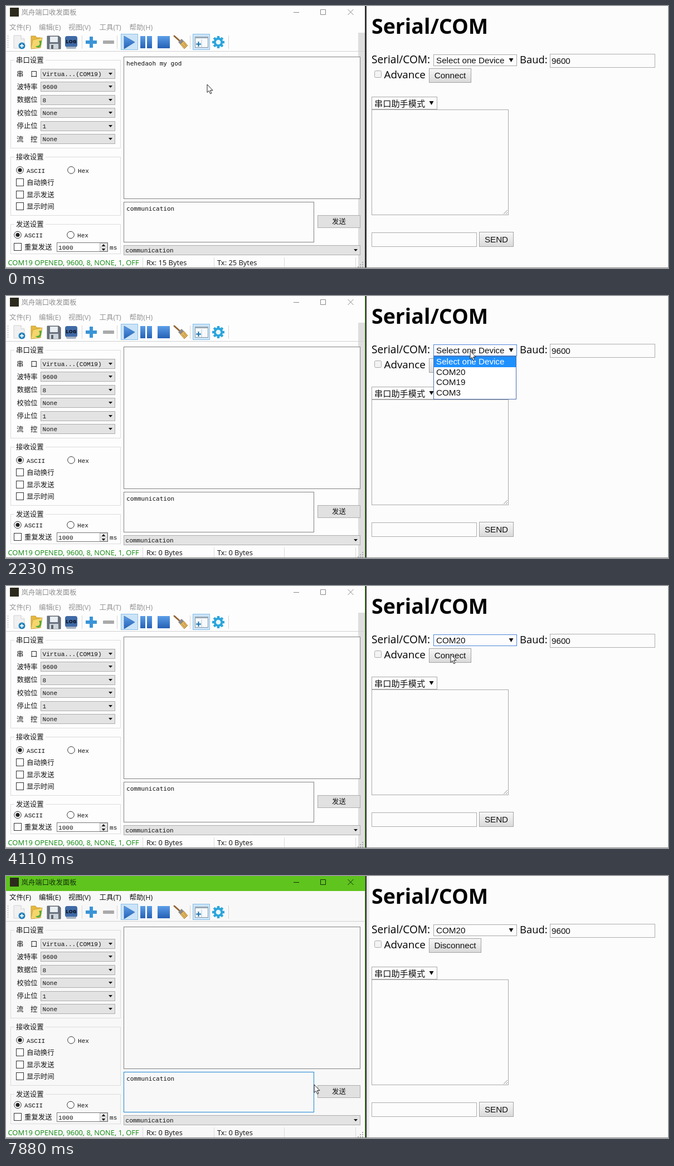
These frames come from a looping animation (1188x471 px, 8000 ms). An HTML page:

```html
<!DOCTYPE html>
<html lang="zh">
<head>
<meta charset="utf-8">
<title>Serial/COM</title>
<style>
html, body { margin: 0; width: 100%; height: 100%; overflow: hidden; background: #fcfcfc; }
svg { display: block; width: 1188px; height: 471px; }
text { white-space: pre; }
.ui { font-family: "Open Sans", "Noto Sans CJK SC", "Noto Sans CJK", sans-serif; }
.web { font-family: "Liberation Sans", "Noto Sans CJK SC", "Noto Sans CJK", sans-serif; }
.mono { font-family: "Liberation Mono", "Noto Sans CJK SC", "Noto Sans CJK", monospace; }
.code { font-family: "DejaVu Sans Mono", monospace; }
</style>
</head>
<body>
<svg id="stage" viewBox="0 0 1188 471" xmlns="http://www.w3.org/2000/svg"></svg>
<script>
const LOOP = 8000;

// Shape helpers; edges fall on whole pixels.
const rect = (x, y, w, h, fill, extra = '') =>
  `<rect x="${x}" y="${y}" width="${w}" height="${h}" fill="${fill}" ${extra}/>`;
const frame = (x, y, w, h, fill, stroke, extra = '') =>
  rect(x + .5, y + .5, w - 1, h - 1, fill, `stroke="${stroke}" ${extra}`);
const path = (d, fill, stroke = 'none', width = 1, extra = '') =>
  `<path d="${d}" fill="${fill}" stroke="${stroke}" stroke-width="${width}" ${extra}/>`;
const circle = (x, y, r, fill, stroke = 'none', width = 1) =>
  `<circle cx="${x}" cy="${y}" r="${r}" fill="${fill}" stroke="${stroke}" stroke-width="${width}"/>`;
const text = (x, y, s, size, font = 'ui', fill = '#111', extra = '') =>
  `<text x="${x}" y="${y}" class="${font}" font-size="${size}" fill="${fill}" ${extra}>${s}</text>`;
const group = (id, body) => `<g id="${id}">${body}</g>`;
const down = (x, y, w, h) => path(`M${x} ${y}h${w}l${-w / 2} ${h}z`, '#111');

const label = (x, y, s) => text(x, y, s, 12.4);
const mono = (x, y, s) => text(x, y, s, 11.05, 'mono');
const code = (x, y, s) => text(x, y, s, 11.02, 'code');
const web = (x, y, s, extra) => text(x, y, s, 15.2, 'web', '#111', extra);

const combo = (x, y, w, h, s) =>
  frame(x, y, w, h, '#e3e3e3', '#adadad') + mono(x + 3.5, y + h / 2 + 4, s) +
  down(x + w - 12, y + h / 2 - 2, 7, 4);
const check = (x, y, s) =>
  frame(x, y, 14, 14, '#fff', '#333') + label(x + 19, y + 11.5, s);
const radio = (x, y, s, on) =>
  circle(x, y, 6.3, '#fff', '#333') + (on ? circle(x, y, 3.6, '#222') : '') + mono(x + 12, y + 4.5, s);
const fieldset = (y, h, s) =>
  frame(8, y, 198, h, 'none', '#dcdcdc') + rect(15, y, 56, 1, 'var(--bg)') + label(18, y + 5, s);
const button = (x, y, w, h, s) =>
  frame(x, y, w, h, 'url(#btn)', '#a3a3a3') + web(x + w / 2, y + h / 2 + 5, s, 'text-anchor="middle"');

function toolbar() {
  const sep = [136, 199, 330, 399].map(x => rect(x, 53, 1, 24, '#d5d5d5')).join('');
  const dots = [53, 57, 61, 65, 69, 73].map(y => rect(3, y, 1, 2, '#aaa')).join('');
  const teeth = [...Array(8)].map((_, i) =>
    rect(378.8, 54, 4.4, 5, '#2ba5dc', `transform="rotate(${i * 45} 381 65)"`)).join('');
  return sep + dots +
    path('M14 53h13l6 6v17h-19z', '#f0f0f0', '#d2d2d2') + path('M27 53v6h6', '#fff', '#ccc') +
    circle(28.5, 71.5, 6, '#1f80b8') + path('M28.5 68v7M25 71.5h7', 'none', '#fff', 1.8) +
    path('M45 54h8l2 3h7v18h-17z', '#e7b83c', '#c39a35') + path('M48 61l17-4-3 18-17 2z', '#f5d66c', '#d1a63c') +
    path('M53 72c8 1 9-5 6-9l5-1-1 6c0 7-6 9-10 4z', '#4cab39') +
    path('M74 54h21l3 3v20h-24z', '#69737f', '#58616b') + rect(79, 55, 14, 10, '#e9eef2') +
    rect(78, 68, 16, 9, '#cdd4da') + rect(81, 70, 4, 7, '#5d6670') +
    rect(106, 54, 22, 20, '#3f6aa6', 'rx="4"') + rect(108, 73, 18, 4, '#a8b4c3', 'rx="2"') +
    text(117, 67, 'LOG', 9.2, 'ui', '#101828', 'font-weight="800" text-anchor="middle"') +
    path('M150 55h6v7h7v6h-7v7h-6v-7h-7v-6h7z', '#3a94d6') +
    rect(174, 62, 20, 6, '#aaa', 'rx="1"') +
    frame(206, 50, 31, 29, '#cce4f7', '#88bfe8') +
    path('M212 54l19 11-19 12z', 'url(#blue)', '#2867b4', .7) +
    rect(241, 54, 9, 22, 'url(#blue)') + rect(253, 54, 9, 22, 'url(#blue)') +
    rect(272, 54, 22, 22, 'url(#blue)') +
    rect(299, 51, 29, 28, '#d9ebf9', 'id="hover"') +
    path('M302 54l10 9', 'none', '#936331', 3, 'stroke-linecap="round"') +
    path('M309 65l6-6 4 4-6 6z', '#8a8a8a') + path('M313 69l6-6 7 8-6 6z', '#e2b65c', '#a87c38', .8) +
    path('M316 69l6 6M319 66l5 7', 'none', '#a87c38', .8) +
    frame(335, 50, 31, 29, '#cce4f7', '#88bfe8') +
    frame(339, 55, 24, 20, '#f6fafc', '#8a969e') + rect(339, 55, 24, 3, '#9aa9b3') +
    path('M351 60v14', 'none', '#bcc7ce') + path('M345.5 64v9M341 68.5h9', 'none', '#176fae', 2) +
    teeth + circle(381, 65, 6.3, '#eef8fc', '#2ba5dc', 4) +
    rect(0, 81, 643, 1, '#d0d0d0');
}

function settings() {
  const rows = [['Virtua...(COM19)'], ['9600', '波特率'], ['8', '数据位'], ['None', '校验位'],
    ['1', '停止位'], ['None']];
  const fields = rows.map(([value, name], i) => {
    const y = 113 + i * 23.4;
    const pair = i ? ['流', '控'] : ['串', '口'];
    const head = name ? label(19.5, y + 13.5, name)
      : label(19, y + 13.5, pair[0]) + label(44, y + 13.5, pair[1]);
    return head + combo(62, Math.round(y), 134, 18, value);
  }).join('');
  return fieldset(97, 159, '串口设置') + fields +
    fieldset(271, 106, '接收设置') + radio(25, 295, 'ASCII', true) + radio(117, 295, 'Hex') +
    check(18, 310, '自动换行') + check(18, 332, '显示发送') + check(18, 353, '显示时间') +
    fieldset(392, 54, '发送设置') + radio(21, 411.5, 'ASCII', true) + radio(116, 411.5, 'Hex') +
    check(14, 426, '重复发送') + frame(91, 425, 92, 17, '#fff', '#777') + mono(94, 437.5, '1000') +
    frame(168, 426, 14, 8, '#eee', '#bbb') + frame(168, 433, 14, 8, '#eee', '#bbb') +
    path('M171.5 432h7l-3.5-4z', '#111') + down(171.5, 436, 7, 4) + mono(186, 438, 'ms');
}

function monitor() {
  const menus = [[6, '文件(F)'], [59, '编辑(E)'], [112, '视图(V)'], [167.5, '工具(T)'], [221.5, '帮助(H)']];
  const grip = [[639, 461], [639, 465], [635, 465], [639, 469], [635, 469], [631, 469]]
    .map(([x, y]) => rect(x, y - 1, 2, 2, '#aaa')).join('');
  return rect(0, 0, 644, 471, 'var(--bg)') +
    rect(0, 0, 644, 27, 'var(--bar)') +
    rect(7, 3, 16, 16, '#2b2a1c') +
    text(27.5, 15.7, '岚舟端口收发面板', 12.4, 'ui', 'var(--title)') +
    path('M516 11.5h10M564.5 6.5h9v9h-9zM613.5 6l10 10M623.5 6l-10 10', 'none', 'var(--ctrl)') +
    menus.map(([x, s]) => text(x, 42.5, s, 12.5, 'ui', 'var(--menu)')).join('') +
    rect(632, 48, 12, 422, '#dedede', 'id="strip"') +
    toolbar() + settings() +
    frame(211, 91, 425, 256, 'var(--box)', '#828282') +
    group('received', code(216, 107, 'hehedaoh my god')) +
    frame(211, 352, 342, 73, 'var(--box)', 'var(--edit)') + code(216, 368, 'communication') +
    rect(303, 358, 1, 13, '#000', 'id="caret"') +
    frame(559, 376, 77, 23, '#e1e1e1', '#adadad') + label(585, 392, '发送') +
    combo(211, 430, 425, 18, 'communication') +
    [245, 373, 499, 627].map(x => rect(x, 452, 1, 18, '#dadada')).join('') +
    text(3.5, 466, 'COM19 OPENED, 9600, 8, NONE, 1, OFF', 12.9, 'ui', '#118a11') +
    text(252, 466, '', 12.9, 'ui', '#111', 'id="rx"') +
    text(379, 466, '', 12.9, 'ui', '#111', 'id="tx"') + grip;
}

const options = ['Select one Device', 'COM20', 'COM19', 'COM3'];

function page() {
  const list = options.map((s, i) =>
    rect(768, Math.round(109 + i * 18.7), 147, 19, '#fff', `id="row${i}"`) +
    web(772, 122.7 + i * 18.8, s, `id="opt${i}"`)).join('');
  return rect(644, 0, 544, 471, '#fcfcfc') +
    rect(647, 0, 6, 471, 'url(#shade)', 'id="shadow"') +
    rect(644, 0, 3, 471, '#333') + rect(644, 0, 1, 471, '#4c9a22', 'id="edge"') +
    text(656, 49.5, 'Serial/COM', 37.5, 'ui', '#000', 'font-weight="700"') +
    text(656, 103, 'Serial/COM:', 19.1, 'ui', '#000') +
    frame(767, 87, 150, 21, '#fdfdfd', '#a9a9a9', 'id="device"') +
    web(772, 103, '', 'id="choice"') + down(902.5, 94, 8, 7) +
    text(922, 103, 'Baud:', 18.4, 'ui', '#000') +
    frame(976, 86, 189, 25, '#fcfcfc', '#adadad') + web(979, 103.5, '9600') +
    frame(661, 116, 13, 13, '#f3f3f3', '#aaa', 'rx="2"') +
    text(678.5, 130, 'Advance', 18.8, 'ui', '#000') +
    group('connect', button(759, 112, 76, 26, 'Connect')) +
    group('disconnect', button(759, 112, 94, 26, 'Disconnect')) +
    frame(656, 163, 118, 23, '#fcfcfc', '#a9a9a9') + web(661, 180.5, '串口助手模式') + down(759.5, 171, 8, 7) +
    frame(656, 186, 246, 190, '#fcfcfc', '#a9a9a9') +
    path('M893 374l7-7M897 374l3-3', 'none', '#888') +
    frame(656, 407, 189, 26, '#fcfcfc', '#adadad') +
    button(849, 406, 62, 27, 'SEND') +
    group('popup', frame(767, 108, 149, 78, '#fff', '#4d6fa8') + list) +
    rect(0, 470, 1188, 1, '#8a8a8a');
}

const gradient = (id, a, b, dir) =>
  `<linearGradient id="${id}" x2="${dir ? 1 : 0}" y2="${dir ? 0 : 1}">` +
  `<stop stop-color="${a}"/><stop offset="1" stop-color="${b}"/></linearGradient>`;

const stage = document.getElementById('stage');
stage.innerHTML = '<defs>' + gradient('btn', '#f7f7f7', '#d9d9d9') +
  gradient('blue', '#5c9ee8', '#2560b5') + gradient('shade', '#d8d8d8', '#fafafa', true) + '</defs>' +
  monitor() + page() +
  group('arrow', path('M0 0V14.4L3.2 11.4 5.7 16.8 7.9 15.8 5.5 10.6H10z', '#fff', '#222', 1)) +
  group('beam', path('M-3 -6.5h2.2l.8 .8 .8 -.8h2.2M0 -6v12M-3 6.5h2.2l.8 -.8 .8 .8h2.2', 'none', '#222', 1.2));

const at = id => document.getElementById(id);
const show = (id, on) => at(id).setAttribute('visibility', on ? 'visible' : 'hidden');

// Pointer steps: time, x, y; the last member marks a text beam.
const steps = [
  [0, 361, 141], [160, 357, 133], [300, 342, 110], [440, 326, 89], [580, 315, 77], [700, 313, 75],
  [1110, 331, 102], [1230, 484, 134], [1350, 637, 141], [1470, 676, 137], [1620, 705, 135],
  [1780, 766, 122], [1930, 812, 105], [2080, 833, 99],
  [2530, 833, 106], [2670, 832, 117], [2800, 830, 130], [2930, 827, 147], [3080, 825, 142], [3220, 824, 137],
  [3810, 818, 133], [3960, 806, 127], [4110, 798, 123], [4260, 796, 122],
  [4830, 802, 138], [4970, 815, 178], [5110, 821, 209, 1],
  [5380, 790, 222, 1], [5510, 670, 288, 1], [5640, 661, 338], [5770, 520, 366, 1], [5900, 372, 367, 1],
  [6040, 329, 367, 1], [6440, 322, 370, 1], [6570, 291, 374, 1], [6700, 250, 378, 1], [6840, 221, 380, 1],
  [7150, 234, 383, 1], [7300, 282, 388, 1], [7450, 320, 390, 1], [7760, 441, 384, 1], [7880, 553, 375]
];

const looks = {
  on: { bg: '#f8f8f8', box: '#f8f8f8', bar: '#5fc41e', title: '#12300a', ctrl: '#122b08', menu: '#111' },
  off: { bg: '#fdfdfd', box: '#fcfcfc', bar: '#fdfdfd', title: '#8f8f8f', ctrl: '#888', menu: '#949494' }
};

function draw(t) {
  const within = (a, b) => t >= a && t < b;
  const [, x, y, beam] = steps.findLast(s => s[0] <= t);
  for (const id of ['arrow', 'beam']) at(id).setAttribute('transform', `translate(${x} ${y})`);
  show('arrow', !beam);
  show('beam', beam);

  const active = within(700, 2230) || t >= 6310;
  const look = looks[active ? 'on' : 'off'];
  for (const key in look) stage.style.setProperty('--' + key, look[key]);
  stage.style.setProperty('--edit', t >= 6310 ? '#1b83d2' : '#828282');
  show('strip', !active);
  show('shadow', active);
  show('edge', t >= 700);
  show('hover', within(580, 1110));
  show('received', t < 830);
  show('caret', within(6310, 6840));
  at('rx').textContent = `Rx: ${t < 1110 ? 15 : 0} Bytes`;
  at('tx').textContent = `Tx: ${t < 1110 ? 25 : 0} Bytes`;

  at('device').setAttribute('stroke', within(2230, 4690) ? '#4d86d8' : '#a9a9a9');
  at('choice').textContent = options[t < 3660 ? 0 : 1];
  show('connect', t < 4690);
  show('disconnect', t >= 4690);
  show('popup', within(2230, 3660));
  const hot = t < 2800 ? 0 : within(2930, 3080) ? 2 : 1;
  options.forEach((_, i) => {
    at('row' + i).setAttribute('fill', i === hot ? '#1e90ff' : '#fff');
    at('opt' + i).setAttribute('fill', i === hot ? '#fff' : '#111');
  });
}

const start = performance.now();
function tick() {
  draw((performance.now() - start) % LOOP);
  requestAnimationFrame(tick);
}
tick();
</script>
</body>
</html>
```
